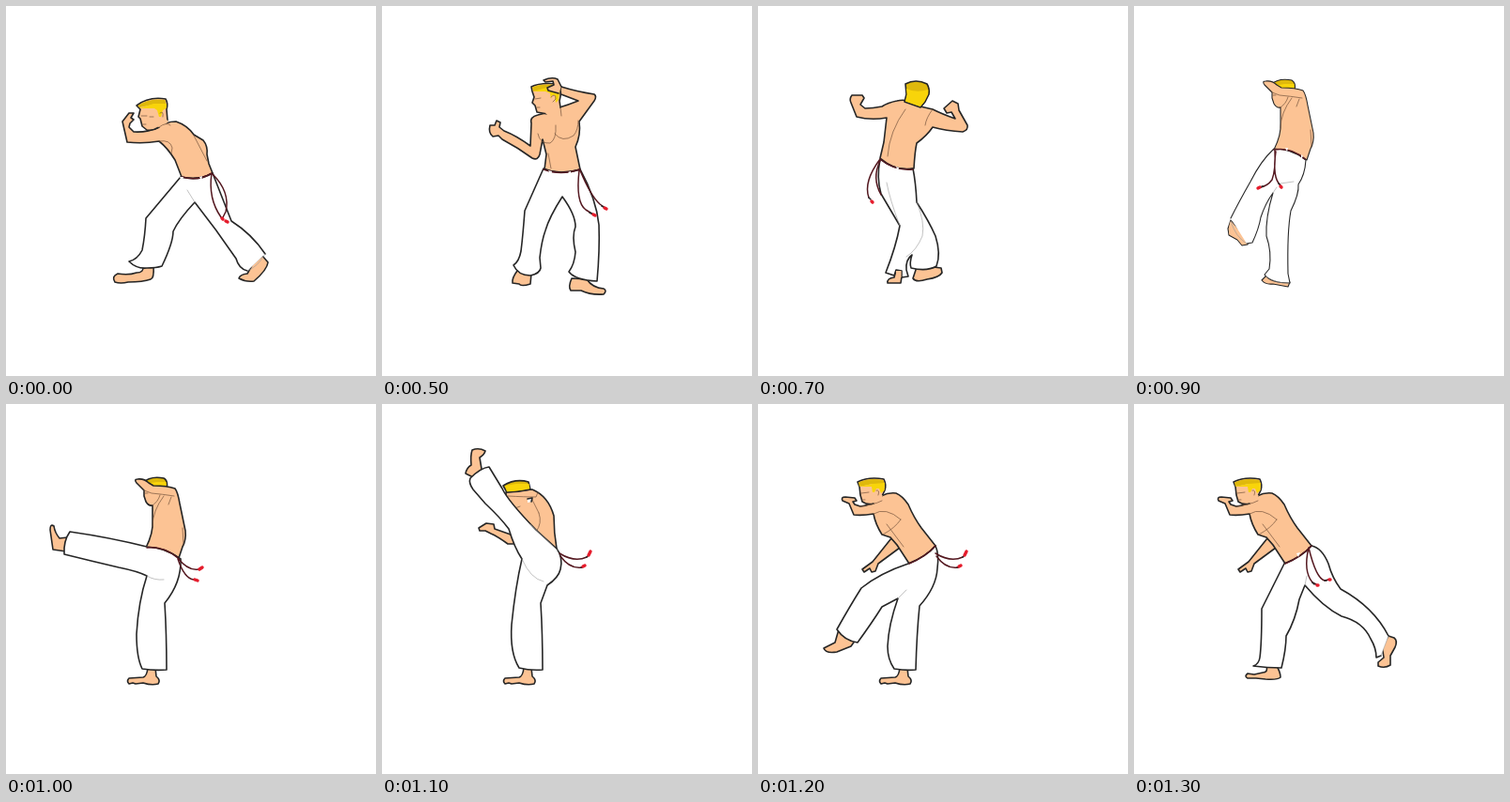
Recreate the animation shown at these times as an HTML page. Size 394 px wide and 394 px high, loop 1.4 s.

```html
<!DOCTYPE html>
<html lang="en">
<head>
<meta charset="utf-8">
<style>
html, body { margin: 0; width: 100%; height: 100%; overflow: hidden; background: #fff; }
svg { display: block; width: 100%; height: 100%; }
g { --edge: 1.6; }
g.thin { --edge: 1.1; }
path { stroke-linecap: round; stroke-linejoin: round; fill: none; }
.skin { fill: #fcc394; stroke: #262626; stroke-width: var(--edge); }
.bare { fill: #fcc394; }
.pants { fill: #fff; stroke: #262626; stroke-width: var(--edge); }
.hair { fill: #dfb90c; stroke: #262626; stroke-width: var(--edge); }
.tuft { fill: #dfb90c; }
.glow { fill: #f8d40a; }
.line { stroke: #75543d; stroke-width: .7; }
.fold { stroke: #999; stroke-width: .6; }
.cord { stroke: #541820; stroke-width: 1.5; }
.knot { stroke: #e51c2c; stroke-width: 3.4; }
.mark { stroke: #262626; stroke-width: 1.6; }
.loop { fill: #fff; }
</style>
</head>
<body>
<svg id="stage" viewBox="0 0 394 394"></svg>
<script>
// Body parts shared by neighbouring poses
const standingFoot = ['skin', 'M151 281Q150 290 146 291L131 292Q128 295 131 298L135 297L138 298L146 297Q155 300 162 298Q165 294 160 290L159 281Z'];

const shieldedTorso = [
  ['hair', 'M145 84Q154 76 168 79Q173 82 171 90L152 90Z'],
  ['glow', 'M149 85L160 83L170.5 83L170.5 88L152 88Z'],
  ['skin', 'M149 153Q157 137 156 125L156 108Q152 109 149 104L147 98L147 92L139 84Q136 80 140 80Q147 79 152 84L157 87Q172 87 180 90Q183 94 185 106L191 135Q192 145 188 152L184 164Q168 152 149 153Z'],
  ['line', 'M147 92L155 95Q166 96 179 98M148 95L151 95M164 97Q162 104 156 108M168 98Q156 114 156 130M176 99L173 107M188 132L189 150']
];

const leaningTorso = [
  ['skin', 'M142 143L126 163L122 168L111 176L113 179L119 175L121 179L125 178L128 170L151 153Z'],
  ['skin', 'M131 98Q139 94 147 95Q154 98 160 107Q166 121 174 132L189 151Q178 163 161 170L148 150L141 142L132 139Q125 128 123 117Q111 119 102 118L97 106L90 103Q88 99 93 99L103 100L105 103L101 104L103 107L109 109Q122 108 131 98Z'],
  ['skin', 'M123 106Q117 108 111 104L109 97L108 88L106 83Q118 77 134 80Q137 86 135 92L132 98'],
  ['bare', 'M122 105L131 96L133 98L127 104Z'],
  ['tuft', 'M107 83.5Q118 78 133.5 81L135 86L122 85L108 88Z'],
  ['glow', 'M108 88L122 85L135 84L134.5 92L131 95L129 90L126 90L124 94L122 94L121 88Z'],
  ['line', 'M110 95L118 94M111 102L114 102M126 92Q130 91 128 97M108 109Q122 108 132 103M123 117Q136 109 152 123M152 123Q146 132 133 139M137 128L155 152']
];

const strikeCords = [
  ['cord', 'M189 159Q205 169 218 163M190 162Q200 176 213 174'],
  ['mark', 'M218 163L219 162M212 174L213 174'],
  ['knot', 'M220 161L222 157M214 173L216 172']
];

const poses = [
  { at: 0, parts: [
    ['skin', 'M163 129Q170 123 181 123Q193 127 200 137L210 143Q215 149 214 158L216 168L220 178Q205 186 187 182L180 164Q172 151 163 144Q146 147 129 145L124 123L131 114L136 114L133 119L136 121L132 125L131 129L136 134Q150 135 163 129Z'],
    ['skin', 'M163 129Q157 133 150 132L145 128L143 120L141 118L143 110L139 106Q152 96 170 99Q173 104 171 110L172 122'],
    ['bare', 'M161 128L170 120L173 123L165 130Z'],
    ['tuft', 'M140.5 106Q152 97.5 169.5 100L171 108L157 105L142 108Z'],
    ['glow', 'M142 109L157 104L171 104L170.5 109L167 111L165 118L163 118L161 111L158 109Z'],
    ['line', 'M144 117L150 117M153 118L157 118M146 126L149 126M164 114Q168 111 167 118M163 129Q171 123 175 127M163 144Q175 142 177 151L176 157M200 138L214 165'],
    ['skin', 'M146 277Q147 284 139 284Q130 287 119 285Q112 288 116 294Q122 296 130 294Q146 294 154 291Q158 290 157 277Z'],
    ['skin', 'M273 266L279 273Q278 281 264 293Q255 294 248 290Q249 286 257 285L262 276Z'],
    ['pants', 'M276 264Q262 243 240 229L220 178Q205 187 186 182L149 226Q148 245 145 260Q140 270 131 272Q139 280 150 279Q160 279 166 277Q178 252 178 240Q184 227 201 209Q224 238 245 269Q248 280 257 282'],
    ['fold', 'M193 196L201 209M276 264Q268 278 257 282'],
    ['cord', 'M187 182Q205 187 219 178M219 178Q215 205 229 225M220 179Q239 198 234 219L231 225'],
    ['loop', 'M206 182L209 181L208 186ZM185 182L189 182L187 186Z'],
    ['knot', 'M230 226L231 227M234 229L236 230']
  ] },
  { at: 500, parts: [
    ['skin', 'M191 86Q207 91 226 94Q229 96 226 101L210 123Q212 137 206 150L211 174Q190 180 173 174L175 158L171 142L168 158Q166 165 160 162Q145 151 128 142L124 138L118 139Q113 135 115 127L120 127L122 122L126 124L125 129L130 133Q143 138 158 149L159 125Q157 118 166 116L174 114L189 108Q199 105 209 101L188 93Z'],
    ['skin', 'M176 115L165 113L163 106L160 103L162 97L160 91L159 86Q168 81 188 83Q192 91 189 101L190 108'],
    ['bare', 'M174 114L186 104L189 107L189 110L178 118Z'],
    ['tuft', 'M160 86.5Q168 82 187.5 84L189 90L175 88L161 91Z'],
    ['glow', 'M161 91L175 87L189.5 88L188 100L185 103L184 95L181 95L180 99L179 93L174 91Z'],
    ['line', 'M163 99L169 98M165 108L168 108M180 97Q185 92 185 99L182 102'],
    ['skin', 'M191 86L187 78Q181 75 172 79L174 81L182 80L183 84L176 87L177 90L188 93'],
    ['line', 'M166 136Q168 147 179 146Q186 142 185 127M184 136Q192 146 204 138Q209 132 209 122M177 157L180 173M190 108L191 117'],
    ['skin', 'M144 282Q138 290 139 295L146 296Q148 299 158 296L159 285Z'],
    ['skin', 'M202 290Q198 299 201 303L212 303Q222 308 236 307Q240 303 236 301Q224 300 218 291Z'],
    ['pants', 'M172 173L152 218Q150 245 148 261Q146 272 140 276Q145 287 158 287Q168 285 169 279L168 268Q170 250 174 239Q178 225 192 203Q206 222 206 235Q202 245 206 262Q205 275 199 283Q206 292 229 293Q232 260 231 233Q228 205 211 174Q190 181 172 173Z'],
    ['cord', 'M172 174Q190 181 211 174M210 175Q206 209 217 217L225 222M211 175Q222 202 232 211L239 216'],
    ['loop', 'M177 175L181 176L180 180ZM198 177L201 176L201 180Z'],
    ['mark', 'M221 220L223 221M234 213L236 214'],
    ['knot', 'M225 222L227 223M237 215L239 216']
  ] },
  { at: 700, parts: [
    ['skin', 'M132 107Q122 109 114 109L109 105L113 98L111 95L100 95Q97 99 99 103L105 118Q120 122 137 119L134 145L130 162Q148 177 166 173Q167 155 169 146Q180 138 186 129Q200 133 218 134Q224 132 223 127L214 111L213 104L207 101L198 109L201 114L206 113L210 120Q196 115 186 110L173 107Q160 98 148 101Q138 103 132 107Z'],
    ['hair', 'M157 83Q168 77 180 83Q183 88 182 94L178 102L173 108L156 102L158 94Z'],
    ['glow', 'M158 88Q168 93 181.3 89L181 94L177 102L172.8 107L157 101.5L158.7 94Z'],
    ['line', 'M157 110Q140 133 138 160M186 110Q179 119 178 127'],
    ['skin', 'M147 281L145 289Q137 290 138 295L152 295L154 282Z'],
    ['skin', 'M169 278L165 290Q168 295 180 291Q193 289 196 284L195 279L187 278Z'],
    ['pants', 'M130 163Q126 183 131 200L151 234Q147 256 136 284L145 287L147 281L153 282L153 289L160 288L158 281Q157 270 164 265Q161 274 163 279Q180 283 190 277Q195 264 189 245Q182 229 169 209Q168 188 165 173Q146 176 130 163Z'],
    ['bare', 'M147 288L147 282L152.5 282L152.5 289Z'],
    ['fold', 'M137 188Q140 205 151 234M169 209Q178 230 175 245Q169 260 158 267'],
    ['cord', 'M130 163Q146 176 165 174M130 163Q112 187 118 204M130 165Q121 183 131 201'],
    ['loop', 'M147 171L150 172L149 176Z'],
    ['mark', 'M118 204L120 206'],
    ['knot', 'M121 208L122 209']
  ] },
  { at: 900, thin: true, parts: [
    ...shieldedTorso,
    ['skin', 'M103 228L100 237L101 244L110 249L115 255L121 254L122 250Z'],
    ['skin', 'M141 287L136 292Q140 297 148 296L164 299L166 294Z'],
    ['pants', 'M120 253L126 252Q133 237 135 225Q140 210 148 199Q140 225 141 245Q147 262 144 280L139 286Q145 295 166 295L164 285Q163 240 167 218Q176 200 175 190Q182 180 183 164Q168 152 149 152Q135 165 124 187Q112 208 103 226'],
    ['bare', 'M102 231L103 229Q108 246 120 253L115 254L110 248L101.5 243L101 237Z'],
    ['fold', 'M148 199L152 193M156 189L170 187M103 229Q108 246 120 253M141 288Q152 296 165 295'],
    ['cord', 'M149 153Q168 150 182 163M150 153Q151 175 147 185Q142 192 134 193M151 155Q147 183 156 191'],
    ['loop', 'M161 151L164 151L163 155ZM178 158L180 160L178 163Z'],
    ['mark', 'M135 193L137 192M154 189L155 190'],
    ['knot', 'M132 194L134 193M156 192L157 193']
  ] },
  { at: 1000, parts: [
    ...shieldedTorso,
    ['skin', 'M66 142L57 143Q52 137 51 130Q47 127 47 134L50 155L64 157Z'],
    standingFoot,
    ['pants', 'M150 152Q110 142 68 136Q61 146 62 160Q90 167 120 174Q140 178 150 183Q141 210 139 245Q139 270 145 282Q158 284 171 283Q171 245 169 212Q187 190 186 165Q170 153 150 152Z'],
    ['fold', 'M150 183Q158 188 168 187'],
    ['cord', 'M150 153Q168 151 183 164M183 164Q194 178 205 176M183 165Q190 186 200 187'],
    ['knot', 'M206 176L209 174M201 187L204 188']
  ] },
  { at: 1100, parts: [
    ['skin', 'M103 132L111 127L119 128L120 133L137 139L144 149L134 149Q123 141 116 138L110 135L104 135Z'],
    ['skin', 'M132 94L160 91Q177 98 183 119Q183 137 186 154L160 138L132 106Z'],
    ['hair', 'M129 87Q142 79 156 83L158 91Q145 94 133 94Z'],
    ['glow', 'M131 87L143 85L156.5 85L157.3 90Q144 93 133 93.3Z'],
    ['line', 'M134 98Q152 99 164 99L166 94M160 102L167 116M167 116Q171 127 164 136M147 109L139 112'],
    ['loop', 'M155 101L160 100L159 104L155 105Z'],
    ['mark', 'M155 101L160 100L159 104'],
    ['skin', 'M99 79L89 74Q90 68 95 65Q94 55 96 49Q103 46 110 50Q109 54 104 57L106 69L104 76Z'],
    standingFoot,
    ['pants', 'M94 79Q92 84 97 91L110 106Q126 121 135 133Q141 153 149 165Q142 195 138 235Q136 265 146 281Q158 284 171 283Q171 245 169 212L176 193Q188 185 190 176Q193 163 186 154L164 134Q134 103 128 90L114 67Q105 68 94 79Z'],
    ['fold', 'M149 165Q158 186 172 189M158 128L187 156'],
    ...strikeCords
  ] },
  { at: 1200, parts: [
    ...leaningTorso,
    ['skin', 'M86 240L82 254L70 260Q72 266 84 264L99 258L104 251Z'],
    standingFoot,
    ['pants', 'M160 170Q130 180 110 196Q98 215 84 240Q92 252 106 254Q122 232 132 216L149 207Q139 235 138 258Q138 272 145 282Q158 284 168 283Q169 245 172 215Q190 195 191 175Q193 160 189 151Q180 162 160 170Z'],
    ['fold', 'M149 207L158 198'],
    ['cord', 'M161 170Q178 163 189 151'],
    ...strikeCords
  ] },
  { at: 1300, parts: [
    ...leaningTorso,
    ['skin', 'M141 279Q143 286 137 286L128 288L121 287Q117 290 121 292L130 292L140 293Q153 294 156 291Q156 286 152 279Z'],
    ['skin', 'M271 247L277 249Q281 252 278 259L273 268L273 278Q267 282 260 279L260 275L266 270L264 257Z'],
    ['pants', 'M271 247Q255 216 220 197Q211 185 207 170Q200 153 189 151Q180 162 160 170L136 218Q136 255 134 270Q133 277 127 279Q142 281 157 281Q162 261 162 247Q172 230 176 208L182 193Q201 216 221 226Q244 232 252 250Q258 260 258 270L263 268'],
    ['fold', 'M182 193L184 183M271 247Q266 260 263 268'],
    ['cord', 'M161 170Q178 163 189 151M186 153Q180 178 190 190L194 192M186 153Q194 186 203 188L207 187'],
    ['loop', 'M173 159L177 158L175 163Z'],
    ['mark', 'M190 190L192 192M203 188L205 188'],
    ['knot', 'M195 193L196 193M208 187L209 187']
  ] }
];

const NS = 'http://www.w3.org/2000/svg';
const stage = document.getElementById('stage');

function add(parent, tag, attrs) {
  const node = document.createElementNS(NS, tag);
  for (const key in attrs) node.setAttribute(key, attrs[key]);
  return parent.appendChild(node);
}

const groups = poses.map(pose => {
  const group = add(stage, 'g', { class: pose.thin ? 'thin' : '' });
  for (const [kind, d] of pose.parts) add(group, 'path', { class: kind, d });
  return group;
});

const start = performance.now();

function draw(now) {
  const t = Math.max(0, now - start) % 1400;
  const current = poses.findLastIndex(pose => pose.at <= t);
  groups.forEach((group, i) => group.style.display = i === current ? '' : 'none');
  requestAnimationFrame(draw);
}
draw(start);
</script>
</body>
</html>
```
